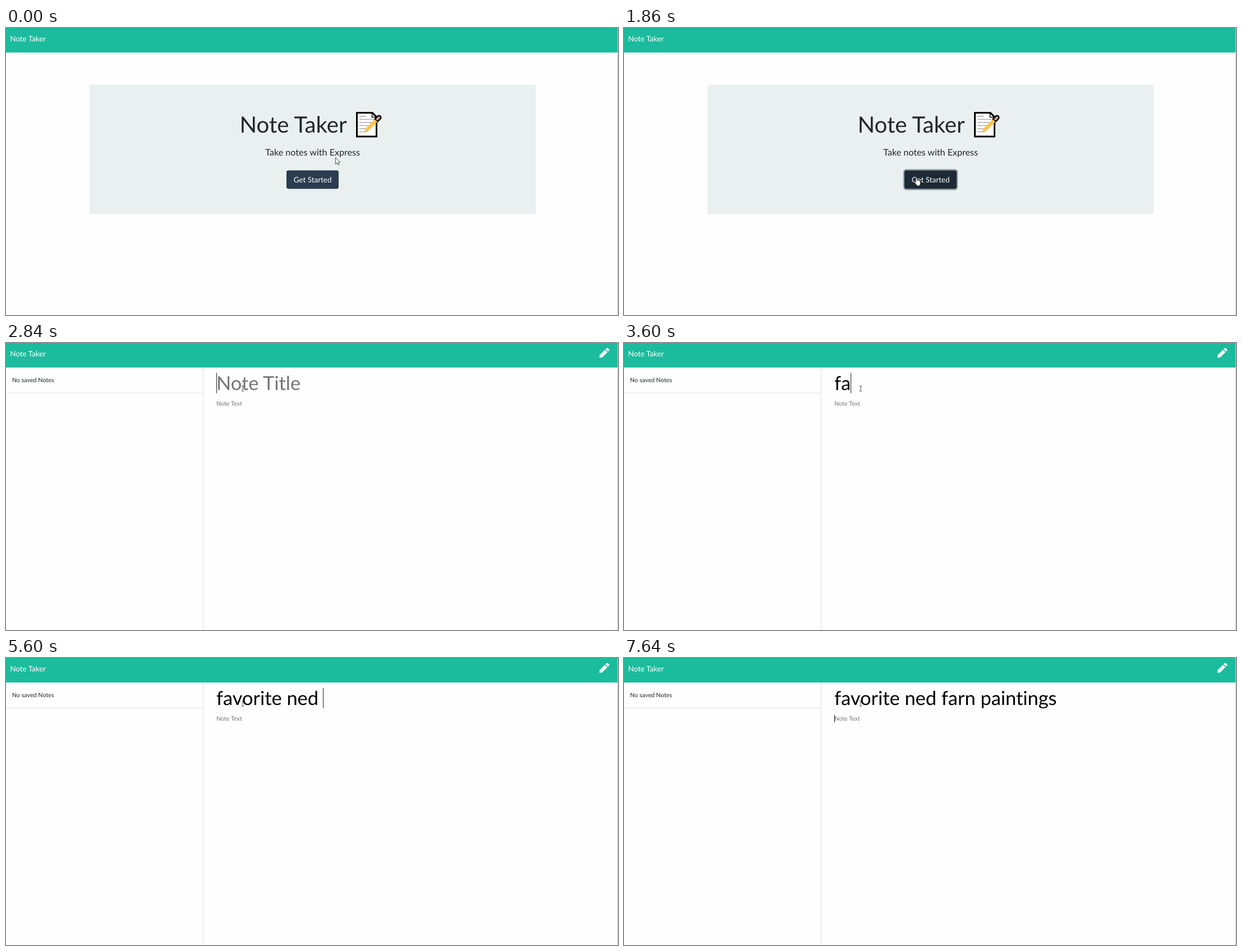
Recreate the animation shown at these times as an HTML page. Size 1091x513 px, loop 8000 ms.

```html
<!DOCTYPE html>
<html lang="en">
<head>
<meta charset="utf-8">
<title>Note Taker</title>
<style>
  html, body { margin: 0; width: 100%; height: 100%; overflow: hidden; background: #fefefe; }
  svg { display: block; width: 100%; height: 100%; }
  text {
    font-family: Lato, sans-serif; font-variant-ligatures: none; white-space: pre;
    text-rendering: geometricPrecision; fill: #212529;
  }
  .mid { text-anchor: middle; }
  .brand { font-size: 13.44px; fill: #fff; }
  .small { font-size: 10.75px; }
  .title { font-size: 34.4px; }
  .hint { fill: #757575; }
</style>
</head>
<body>
<svg viewBox="0 0 1091 513">
  <defs>
    <clipPath id="titleBox"><rect x="370" y="53" width="700" height="36.7"/></clipPath>
  </defs>
  <rect width="1091" height="513" fill="#fefefe"/>
  <rect width="1091" height="43.8" fill="#1abc9d"/>
  <text class="brand" x="7.2" y="23.5">Note Taker</text>

  <g id="home">
    <rect x="148.7" y="101.4" width="795.7" height="231.4" rx="3.4" fill="#eaf0f0"/>
    <text x="416.5" y="187" font-size="40.13">Note Taker</text>
    <g stroke-linejoin="round" fill="none">
      <path d="M625.5 151.6H653L660.5 159V193.9H625.5Z" fill="#fff" stroke="#000" stroke-width="3" stroke-linejoin="miter"/>
      <path d="M652.5 152V159.5H660" stroke="#000" stroke-width="1.5"/>
      <path d="M630 157.8H642M630 163.3H655M630 168.8H655M630 174.3H650M630 179.8H645M630 185.3H638" stroke="#b5b5b5" stroke-width="1.8"/>
      <path d="M660.5 164.5L665 160" stroke="#000" stroke-width="9" stroke-linecap="round"/>
      <path d="M662 163L665 160" stroke="#c99a8f" stroke-width="4.2" stroke-linecap="round"/>
      <path d="M638 187.5L640.3 180.5L657.5 163.3L662 167.8L644.8 185Z" fill="#fbc549"/>
      <path d="M638 187.5L640.3 180.5L644.8 185Z" fill="#e8bd8c"/>
    </g>
    <text class="mid" x="546.7" y="228" font-size="16.13">Take notes with Express</text>
    <rect id="ring" x="498.9" y="253.3" width="95.2" height="35.3" rx="4.3" fill="none" stroke="#909ca6" stroke-width="2.3"/>
    <rect id="button" x="500" y="254.4" width="93" height="33" rx="3.3"/>
    <text class="brand mid" x="546.6" y="275.8">Get Started</text>
  </g>

  <g id="notes">
    <g transform="translate(1057.7 8.6)" fill="#f4f8f8">
      <path d="M10 3.5L14.5 8L5.3 17.2L.9 18Q0 18.1 .1 17.2L.8 12.7Z"/>
      <path d="M11 2.5L12.9 .7Q14.1-.4 15.3 .7L17.3 2.7Q18.5 3.9 17.3 5.1L15.5 7Z"/>
    </g>
    <path d="M351.7 43.8V513" stroke="#dfe1e3"/>
    <g id="saved">
      <text class="small" x="10.75" y="70.2">No saved Notes</text>
      <path d="M0 89.2H351.2" stroke="#e3e5e6"/>
    </g>
    <text class="small hint" x="375" y="111.5">Note Text</text>
    <g clip-path="url(#titleBox)">
      <text id="hint" class="title hint" x="375" y="84">Note Title</text>
      <text id="typed" class="title" x="375" y="84" style="fill:#000"></text>
    </g>
    <path id="spell" stroke="#f22" stroke-width="1.2" stroke-dasharray="1.6 .7"/>
    <path id="caret" stroke="#222"/>
  </g>

  <path d="M1090.5 0V513" stroke="#cbcbcb"/>

  <g id="arrow">
    <path d="M.4 .6V12.5L3.2 9.9L5 14.1L6.9 13.3L5.1 9.2H8.7Z" fill="#fff" stroke="#222" stroke-width=".8"/>
  </g>
  <g id="hand">
    <path d="M3.3 9V1.7Q3.4 .4 4.4 .4Q5.5 .4 5.6 1.7V5.4Q6.9 4.6 7.6 5.8Q8.9 5.2 9.5 6.5Q11.3 6 11.4 7.8V10.5Q11.3 12.3 10.3 13.2V15H4.7V13.6Q3.2 12.3 2.2 10.4L.7 8.1Q.3 6.8 1.5 6.7Q2.3 6.8 3.3 9Z" fill="#fff" stroke="#111" stroke-width=".7"/>
  </g>
  <g id="beam">
    <path d="M-2.2-4.5H-.6L0-4L.6-4.5H2.2M0-4V4M-2.2 4.5H-.6L0 4L.6 4.5H2.2" fill="none" stroke="#333" stroke-width=".9"/>
  </g>
</svg>
<script>
const LOOP = 8000, LEFT = 375;
const OPEN = 2010, LISTED = 2130, FOCUS = 2840, MARK = 6280, BLUR = 7640;
const phrase = 'favorite ned farn paintings';
const odd = phrase.indexOf('farn');

// time, pointer, x, y
const moves = [
  [0, 'arrow', 587, 231], [440, 'arrow', 587, 228], [560, 'arrow', 587, 226],
  [960, 'arrow', 583, 237], [1110, 'hand', 567, 258], [1260, 'hand', 545, 274],
  [1410, 'arrow', 530, 288], [1560, 'hand', 522, 278], [1710, 'hand', 517, 267],
  [2010, 'beam', 516.5, 260.5], [2130, 'beam', 514, 250], [2270, 'beam', 480, 210],
  [2410, 'beam', 436, 160], [2550, 'beam', 413, 130], [2700, 'beam', 418, 101],
  [2840, 'beam', 422, 81.5]
];

// time, characters typed
const keys = [
  [0, 0], [3350, 1], [3600, 2], [3730, 3], [3850, 4], [3980, 5], [4110, 6],
  [4490, 7], [4630, 8], [4910, 9],
  [5180, 10], [5310, 11], [5450, 12], [5590, 13], [5720, 15], [5860, 16], [6000, 17],
  [6280, 19], [6410, 20], [6550, 22], [6690, 23], [6830, 25], [6980, 26], [7360, 27]
];

const el = id => document.getElementById(id);
const show = (id, on) => { el(id).style.display = on ? '' : 'none'; };
const at = (table, t) => table.filter(row => row[0] <= t).pop();

function drawPointer(t) {
  const [, kind, x, y] = at(moves, t);
  for (const id of ['arrow', 'hand', 'beam']) show(id, id === kind);
  el(kind).setAttribute('transform', `translate(${x} ${y})`);
  el('button').setAttribute('fill', kind === 'hand' ? '#1d2a36' : '#2a3c4f');
}

function drawTitle(t) {
  const count = at(keys, t)[1], typed = el('typed');
  const text = phrase.slice(0, count);
  if (typed.textContent !== text) typed.textContent = text;
  show('hint', !count);

  const marked = t >= MARK && t < BLUR;
  show('spell', marked);
  if (marked) {
    const from = LEFT + typed.getSubStringLength(0, odd);
    const to = from + typed.getSubStringLength(odd, 4);
    el('spell').setAttribute('d', `M${from} 86.2H${to}`);
  }

  show('caret', t >= FOCUS);
  const end = count ? typed.getComputedTextLength() : 0;
  const x = Math.floor(LEFT + end) + .5;
  el('caret').setAttribute('d', t < BLUR ? `M${x} 53.3V89.7` : `M${LEFT + .5} 101.5V115`);
}

function draw(t) {
  show('home', t < OPEN);
  show('notes', t >= OPEN);
  show('ring', t >= 1860);
  show('saved', t >= LISTED);
  drawPointer(t);
  if (t >= OPEN) drawTitle(t);
}

const start = performance.now();
function tick() {
  draw((performance.now() - start) % LOOP);
  requestAnimationFrame(tick);
}
tick();
</script>
</body>
</html>
```
